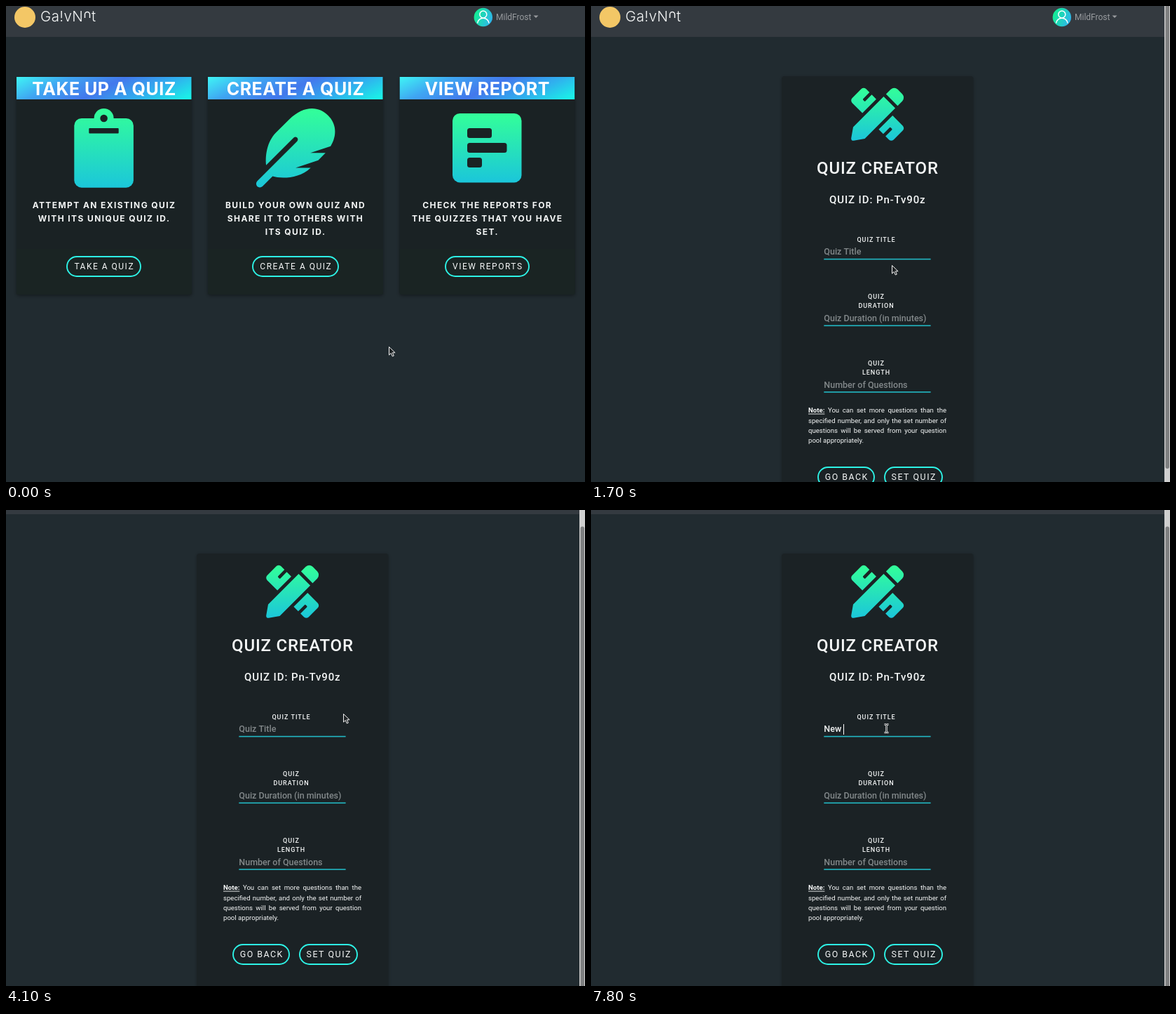
An HTML page with a canvas for the animation above (8 s loop, 826 by 678 pixels).

```html
<!DOCTYPE html>
<html lang="en">
<head>
<meta charset="utf-8">
<title>Quiz dashboard</title>
<style>
html, body { margin: 0; width: 100%; height: 100%; overflow: hidden; background: #212b30; }
canvas { display: block; }
</style>
</head>
<body>
<canvas id="stage" width="826" height="678"></canvas>
<script>
const W = 826, H = 678, LOOP = 8000, TICK = 100;
const ctx = document.getElementById('stage').getContext('2d');

const BG = '#212b30', NAV = '#343a40', CARD = '#1a2224', CYAN = '#2df3e6', WHITE = '#f5f7f7';
const ROBOTO = 'Roboto, sans-serif', INTER = 'Inter, sans-serif';

const FEATHER = new Path2D('M467 45C405-18 306-20 215 71L129 156C69 217 59 307 65 367L244 189q11-9 22 0q10 11 0 23L7 471q-13 17 0 34q17 13 34 0l66-66C159 455 279 457 354 384H256L403 335 450 288H352L483 244C529 170 518 95 467 45z');
const RULER = new Path2D('M109 244L244 109 200 65 138 127q-6 5-11 0l-11-11q-5-6 0-11l62-62-34-34Q121-9 99 9L9 99Q-9 121 9 144z');
const PENCIL = new Path2D('M498 127Q526 93 498 59L453 14Q419-14 385 14L339 60 452 173zM316 83L19 380 0 487Q-2 514 25 512L132 493 429 196z');
const ARROW = new Path2D('M0 0V11.6L2.8 9 4.8 13.5 6.8 12.6 4.9 8.3H8.6z');
const HAND = new Path2D('M-1.5 1q1.5-2.4 3 0V6q5 0 6 2v4l-1.5 2.5H0L-3.5 9.5q0-2 2-.5z');
const IBEAM = new Path2D('M-3-5.5H-1Q0-5 0-4V4.5Q0 5.5-1 6H-3M3-5.5H1Q0-5 0-4M3 6H1Q0 5.5 0 4.5');

const CARDS = [
  { x: 15, title: 'TAKE UP A QUIZ', lines: ['ATTEMPT AN EXISTING QUIZ', 'WITH ITS UNIQUE QUIZ ID.'],
    label: 'TAKE A QUIZ', button: [86, 107], icon: clipboardIcon },
  { x: 288, title: 'CREATE A QUIZ', lines: ['BUILD YOUR OWN QUIZ AND', 'SHARE IT TO OTHERS WITH', 'ITS QUIZ ID.'],
    label: 'CREATE A QUIZ', button: [351, 124], icon: featherIcon },
  { x: 561.7, title: 'VIEW REPORT', lines: ['CHECK THE REPORTS FOR', 'THE QUIZZES THAT YOU HAVE', 'SET.'],
    label: 'VIEW REPORTS', button: [626, 121], icon: reportIcon },
];
const FIELDS = [
  { y: 350, labels: ['QUIZ TITLE'], hint: 'Quiz Title' },
  { y: 444.7, labels: ['QUIZ', 'DURATION'], hint: 'Quiz Duration (in minutes)' },
  { y: 539.3, labels: ['QUIZ', 'LENGTH'], hint: 'Number of Questions' },
];
const NOTE = [
  'Note: You can set more questions than the',
  'specified number, and only the set number of',
  'questions will be served from your question',
  'pool appropriately.',
];

// Each leg: first tick, last tick, destination
const CURSOR_START = [546.5, 485.5];
const CURSOR_LEGS = [
  [500, 1200, 431, 368],
  [1700, 1700, 429.5, 369.5],
  [2300, 2800, 434.5, 336.5],
  [3600, 3800, 478, 293],
  [4100, 4100, 481.5, 290.5],
  [4200, 4800, 422, 313],
  [5400, 5400, 421.5, 311],
];

const clamp = v => Math.max(0, Math.min(1, v));
const ease = v => v * v * (3 - 2 * v);
const ramp = (t, first, last) => clamp((t - first + TICK) / (last - first + TICK));

function cursorAt(t) {
  let [x, y] = CURSOR_START;
  for (const [first, last, tx, ty] of CURSOR_LEGS) {
    const k = ease(ramp(t, first, last));
    x += (tx - x) * k;
    y += (ty - y) * k;
  }
  return [x, y];
}

function gradient(x0, y0, x1, y1, ...colors) {
  const g = ctx.createLinearGradient(x0, y0, x1, y1);
  colors.forEach((c, i) => g.addColorStop(i / (colors.length - 1), c));
  return g;
}

const iconFill = (top, bottom) => gradient(0, top, 0, bottom, '#33ff99', '#1bc6da');

function box(x, y, w, h, r, fill, stroke, line = 1) {
  ctx.beginPath();
  ctx.roundRect(x, y, w, h, r);
  if (fill) { ctx.fillStyle = fill; ctx.fill(); }
  if (stroke) { ctx.strokeStyle = stroke; ctx.lineWidth = line; ctx.stroke(); }
}

function disc(x, y, r, fill) {
  ctx.beginPath();
  ctx.arc(x, y, r, 0, Math.PI * 2);
  ctx.fillStyle = fill;
  ctx.fill();
}

function shadowBox(x, y, w, h, r, color, blur, fill, dy = 0) {
  ctx.save();
  ctx.shadowColor = color;
  ctx.shadowBlur = blur;
  ctx.shadowOffsetY = dy;
  box(x, y, w, h, r, fill);
  ctx.restore();
}

// cy is the middle of the capital letters
function text(str, x, cy, size, { weight = 400, family = ROBOTO, color = WHITE, spacing = 0, align = 'center' } = {}) {
  ctx.font = `${weight} ${size}px ${family}`;
  ctx.letterSpacing = spacing + 'px';
  ctx.textAlign = align;
  ctx.fillStyle = color;
  ctx.fillText(str, align === 'center' ? x + spacing / 2 : x, cy + size * 0.358);
  return ctx.measureText(str).width;
}

function clipboardIcon() {
  const fill = iconFill(146, 259);
  box(97.3, 160, 84.6, 98.7, 10.5, fill);
  disc(139.6, 160, 14, fill);
  disc(139.6, 160, 5.3, CARD);
  box(118.3, 174, 42.4, 7.4, 1, CARD);
}

function featherIcon() {
  ctx.save();
  ctx.translate(356.8, 146);
  ctx.scale(0.22, 0.22);
  ctx.fillStyle = iconFill(0, 512);
  ctx.fill(FEATHER);
  ctx.restore();
}

function reportIcon() {
  box(637, 153, 98.5, 98.4, 10.5, iconFill(153, 251));
  [35, 56.5, 21].forEach((w, i) => box(658, 174 + i * 21, w, 14, 3.5, CARD));
}

function toolsIcon() {
  ctx.save();
  ctx.translate(371.2, 116.8);
  ctx.scale(0.1465, 0.1465);
  ctx.fillStyle = iconFill(0, 512);
  ctx.fill(RULER);
  ctx.fill(PENCIL);
  ctx.translate(512, 512);
  ctx.rotate(Math.PI);
  ctx.fillStyle = iconFill(512, 0);
  ctx.fill(RULER);
  ctx.restore();
}

function navbar(width, shift) {
  ctx.fillStyle = NAV;
  ctx.fillRect(0, 0, width, 44);
  disc(27, 16, 15, '#f3c766');

  text('Ga!vN', 49, 14.7, 20.5, { weight: 300, family: INTER, spacing: 0.4, align: 'left' });
  ctx.strokeStyle = WHITE;
  ctx.lineWidth = 1.5;
  ctx.beginPath();
  ctx.moveTo(112.5, 17);
  ctx.lineTo(112.5, 12);
  ctx.arc(116, 12, 3.5, Math.PI, 0);
  ctx.lineTo(119.5, 17);
  ctx.stroke();
  text('t', 122, 14.7, 20.5, { weight: 300, family: INTER, align: 'left' });

  ctx.save();
  ctx.translate(shift, 0);
  disc(680.8, 16, 13.2, gradient(668, 10, 694, 20, '#12ef8f', '#2fb4ee'));
  ctx.strokeStyle = '#fff';
  ctx.lineWidth = 1.5;
  ctx.beginPath();
  ctx.arc(680.8, 12, 5, 0, Math.PI * 2);
  ctx.moveTo(672.6, 24.5);
  ctx.bezierCurveTo(673.5, 14.8, 688, 14.8, 689, 24.5);
  ctx.stroke();
  const gray = '#999c9f';
  text('MildFrost', 699, 15.3, 12, { color: gray, align: 'left' });
  ctx.fillStyle = gray;
  ctx.beginPath();
  ctx.moveTo(752.5, 13.5);
  ctx.lineTo(759.5, 13.5);
  ctx.lineTo(756, 17);
  ctx.fill();
  ctx.restore();
}

function pill(x, y, w, label, size, hover = 0) {
  const h = 30;
  if (hover) {
    ctx.save();
    ctx.globalAlpha = hover;
    shadowBox(x, y, w, h, 15, 'rgba(31,157,240,.9)', 20, '#2fa3d2');
    shadowBox(x, y, w, h, 15, 'rgba(47,168,220,.6)', 6, '#2fa3d2');
    ctx.restore();
  }
  box(x + 1, y + 1, w - 2, h - 2, 14, null, CYAN, 1.9);
  text(label, x + w / 2, y + 14.8, size, { spacing: 1.5, color: hover > 0.5 ? '#0a1114' : WHITE });
}

function card({ x, title, lines, label, button, icon }, glow, hover) {
  const w = 250, y = 101, h = 310, cx = x + w / 2 - 0.2;
  shadowBox(x, y, w, h, 3, 'rgba(0,0,0,.4)', 5, CARD, 1.5);
  if (glow) {
    ctx.save();
    ctx.globalAlpha = glow;
    shadowBox(x, y, w, h, 3, 'rgba(120,230,170,.6)', 42, CARD);
    for (const blur of [20, 20, 7]) shadowBox(x, y, w, h, 3, '#98f0c0', blur, CARD);
    ctx.restore();
  }
  box(x, 346, w, 65, [0, 0, 3, 3], '#1a2423');
  const bandHeight = 32, my = y + bandHeight / 2;
  ctx.fillStyle = gradient(cx - 31, my - 63, cx + 31, my + 63, '#3ff7f5', '#3fa6f2', '#4378ec', '#2fb2ee', '#17fbe6');
  ctx.fillRect(x, y, w - 0.5, bandHeight);
  text(title, cx, 117.6, 25, { weight: 700, family: INTER, color: '#fff', spacing: 0.5 });
  icon();
  lines.forEach((line, i) =>
    text(line, cx - 0.5, 283.7 + i * 19.2, 12, { weight: 700, family: INTER, spacing: 1.4 }));
  pill(button[0], 356, button[1], label, 12, hover);
}

function dashboard(t) {
  navbar(W, 0);
  const glow = t >= 900 ? ramp(t, 900, 1100) : 0;
  const hover = t >= 1100 ? ramp(t, 1100, 1200) : 0;
  CARDS.forEach((c, i) => i === 1 ? card(c, glow, hover) : card(c, 0, 0));
}

function note() {
  const left = 310, width = 197, size = 9.6;
  NOTE.forEach((line, i) => {
    const y = 576 + i * 14.3, words = line.split(' ');
    const weight = word => word === 'Note:' ? 700 : 400;
    ctx.letterSpacing = '0px';
    const widths = words.map(word => {
      ctx.font = `${weight(word)} ${size}px ${ROBOTO}`;
      return ctx.measureText(word).width;
    });
    const sum = widths.reduce((a, b) => a + b, 0);
    const gap = i === NOTE.length - 1 ? size * 0.247 : (width - sum) / (words.length - 1);
    let x = left;
    words.forEach((word, j) => {
      text(word, x, y, size, { weight: weight(word), align: 'left' });
      if (word === 'Note:') ctx.fillRect(x, y + 4.6, widths[j], 0.9);
      x += widths[j] + gap;
    });
  });
}

function typedTitle(t) {
  return 'New '.slice(0, [7300, 7400, 7600, 7800].filter(at => t >= at).length);
}

function form(t) {
  const typed = typedTitle(t);
  navbar(818, -9);
  shadowBox(272, 100, 273.5, 660, 4, 'rgba(0,0,0,.25)', 5, '#1b2225', 1);
  toolsIcon();
  text('QUIZ CREATOR', 408.5, 230.5, 24, { weight: 500, spacing: 0.8 });
  text('QUIZ ID: Pn-Tv90z', 408.3, 275.7, 15, { weight: 500, spacing: 0.9 });

  FIELDS.forEach(({ y, labels, hint }, i) => {
    labels.forEach((label, j) =>
      text(label, 406.5, y - 17.5 - (labels.length - 1 - j) * 13.5, 9, { weight: 500, spacing: 0.95 }));
    const value = i === 0 ? typed : '';
    const width = text(value || hint, 332.3, y, 12.5,
      { weight: 500, align: 'left', color: value ? WHITE : '#82888a' });
    if (i === 0 && t >= 7100) {
      ctx.fillStyle = '#fff';
      ctx.fillRect(Math.round(332 + (value ? width : 0)), 343, 1, 15);
    }
    ctx.fillStyle = '#22b8c4';
    ctx.fillRect(332.3, y + 9.8, 152.3, 1.6);
  });

  note();
  pill(323, 656, 82, 'GO BACK', 12.4);
  pill(418, 656, 84, 'SET QUIZ', 12.4);
}

function scrollbar(scroll) {
  ctx.fillStyle = '#cfcfcf';
  ctx.fillRect(818, 0, 8, H);
  const top = scroll * 0.7 - 3;
  box(819.5, top, 5.5, 662, 3, '#7e7f80');
}

function tooltip(t) {
  const alpha = t < 5800 ? 0 : t < 7300 ? ramp(t, 5800, 6000) : 1 - ramp(t, 7300, 7400);
  if (!alpha) return;
  ctx.save();
  ctx.globalAlpha = alpha;
  box(422.7, 329, 137, 32, 3.5, '#030404', '#30383b');
  text('Please fill out this field.', 432.3, 345.5, 11.1, { family: '"Open Sans", sans-serif', align: 'left' });
  ctx.restore();
}

function cursor(t, scroll) {
  const [x, y] = cursorAt(t), onForm = t >= 1700;
  const inside = (l, top, r, b) => x >= l && x <= r && y >= top && y <= b;
  ctx.save();
  ctx.translate(x, y);
  ctx.lineJoin = 'round';
  if (onForm && inside(332, 342 - scroll, 484, 361 - scroll)) {
    ctx.strokeStyle = '#f4f4f4';
    ctx.lineWidth = 2.4;
    ctx.stroke(IBEAM);
    ctx.strokeStyle = '#161a1c';
    ctx.lineWidth = 0.8;
    ctx.stroke(IBEAM);
  } else if (!onForm && inside(351, 356, 474, 386)) {
    ctx.fillStyle = '#fff';
    ctx.strokeStyle = '#14181a';
    ctx.lineWidth = 1.4;
    ctx.stroke(HAND);
    ctx.fill(HAND);
  } else {
    ctx.fillStyle = '#202426';
    ctx.strokeStyle = '#f2f2f2';
    ctx.lineWidth = 1;
    ctx.fill(ARROW);
    ctx.stroke(ARROW);
  }
  ctx.restore();
}

function scrollAt(t) {
  const k = clamp((t - 2700) / 500);
  return Math.round(38 * (k < 0.4 ? k * k * 1.5 : 0.24 + (k - 0.4) * 0.76 / 0.6));
}

function draw(t) {
  ctx.fillStyle = BG;
  ctx.fillRect(0, 0, W, H);
  const scroll = scrollAt(t);
  if (t < 1700) {
    dashboard(t);
  } else {
    ctx.save();
    ctx.translate(0, -scroll);
    form(t);
    ctx.restore();
    scrollbar(scroll);
    tooltip(t);
  }
  cursor(t, scroll);
}

function frame() {
  const t = performance.now() % LOOP;
  draw(Math.floor(t / TICK) * TICK);
  requestAnimationFrame(frame);
}
frame();
</script>
</body>
</html>
```
